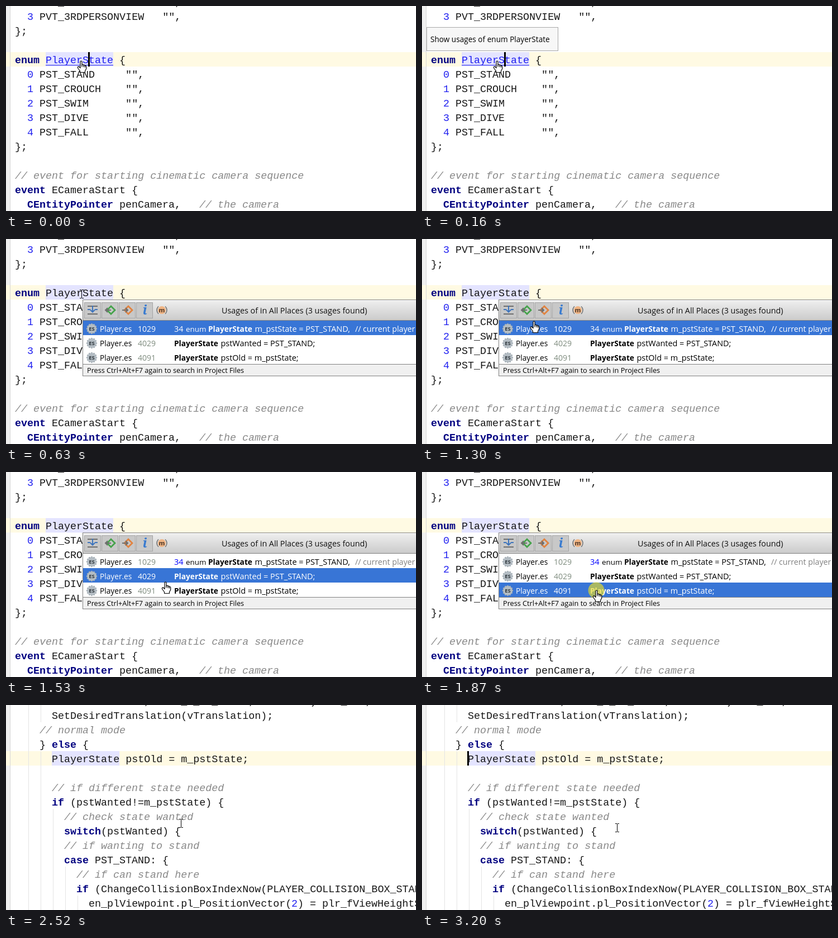
These frames come from a looping animation (734 by 369 pixels, 3280 ms). An HTML page with a canvas:

```html
<!DOCTYPE html>
<html lang="en">
<head>
<meta charset="utf-8">
<title>Show usages popup</title>
<style>
html, body { margin: 0; width: 100%; height: 100%; overflow: hidden; background: #fff; }
canvas { display: block; width: 734px; height: 369px; }
</style>
</head>
<body>
<canvas id="stage" width="734" height="369"></canvas>
<script>
const W = 734, H = 369, LOOP = 3280;
const LEFT = 16, CELL = 11, ROW = 26, TOP = 5, LIST = 147;
const ctx = document.getElementById('stage').getContext('2d');
const MONO = '18.35px "Liberation Mono", "Courier New", monospace';
const UI = '"Open Sans", "Noto Sans", sans-serif';
const INK = '#161616', NUMBER = '#2020f0';
const TOKENS = /\/\/.*|\b(?:enum|event|CEntityPointer|else|if|switch|case)\b|\b\d\b/g;

const enumCode = [
  '    PVT_                  ,',
  '  3 PVT_3RDPERSONVIEW   "",',
  '};',
  '',
  'enum PlayerState {',
  '  0 PST_STAND     "",',
  '  1 PST_CROUCH    "",',
  '  2 PST_SWIM      "",',
  '  3 PST_DIVE      "",',
  '  4 PST_FALL      "",',
  '};',
  '',
  '// event for starting cinematic camera sequence',
  'event ECameraStart {',
  '  CEntityPointer penCamera,   // the camera'
];
const stateCode = [
  ' '.repeat(21) + ',     _ _  _     ,         )    _   ,',
  '      SetDesiredTranslation(vTranslation);',
  '    // normal mode',
  '    } else {',
  '      PlayerState pstOld = m_pstState;',
  '',
  '      // if different state needed',
  '      if (pstWanted!=m_pstState) {',
  '        // check state wanted',
  '        switch(pstWanted) {',
  '        // if wanting to stand',
  '        case PST_STAND: {',
  '          // if can stand here',
  '          if (ChangeCollisionBoxIndexNow(PLAYER_COLLISION_BOX_STAND)) {',
  '            en_plViewpoint.pl_PositionVector(2) = plr_fViewHeightStand;'
];

function rect(x, y, w, h, color) {
  ctx.fillStyle = color;
  ctx.fillRect(x, y, w, h);
}

function text(s, x, y, font, color) {
  ctx.font = font;
  ctx.fillStyle = color;
  ctx.fillText(s, x, y);
}

function ui(s, x, y, size, color, weight = '') {
  text(s, x, y, `${weight} ${size}px ${UI}`, color);
}

function stroke(points, color, width = 2) {
  ctx.beginPath();
  points.forEach(([x, y]) => ctx.lineTo(x, y));
  ctx.strokeStyle = color;
  ctx.lineWidth = width;
  ctx.stroke();
}

function disc(x, y, r, color) {
  ctx.beginPath();
  ctx.arc(x, y, r, 0, Math.PI * 2);
  ctx.fillStyle = color;
  ctx.fill();
}

const colX = col => LEFT + col * CELL;

function codeLine(line, y) {
  let at = 0;
  const put = (s, style, color) => {
    text(s, colX(at), y, style + ' ' + MONO, color);
    at += s.length;
  };
  for (const m of line.matchAll(TOKENS)) {
    put(line.slice(at, m.index), '', INK);
    if (m[0].startsWith('//')) put(m[0], 'italic', '#888');
    else if (/\d/.test(m[0])) put(m[0], '', NUMBER);
    else put(m[0], 'bold', '#000080');
  }
  put(line.slice(at), '', INK);
}

function editor(lines, nameCol, guides) {
  rect(0, 0, W, H, '#fff');
  rect(0, 0, 7, H, '#f0f0f0');
  rect(0, 83, W, ROW, '#fffae3');
  rect(7, 0, 1, H, '#d6d6d6');
  guides.forEach(([x, y, h]) => rect(x, y, 1, h, '#e4e4e4'));
  rect(colX(nameCol), 83, 121, ROW, '#e4e4ff');
  lines.forEach((line, i) => codeLine(line, TOP + (i - 1) * ROW + 20));
}

function caret(col) {
  rect(colX(col) - 1, 83, 3, ROW, '#000');
}

function link() {
  rect(71, 83, 121, ROW, '#e4e4ff');
  text('PlayerState', 71, 103, MONO, NUMBER);
  rect(71, 106, 121, 1, NUMBER);
}

function tooltip() {
  rect(8, 38, 236, 43, '#a8a8a8');
  rect(9, 39, 234, 41, '#f7f7f7');
  ui('Show usages of enum PlayerState', 15, 65, 13.6, '#000');
}

function fileIcon(x, y) {
  for (let i = 0; i < 12; i++) {
    const a = i * Math.PI / 6;
    disc(x + 8 * Math.cos(a), y + 8 * Math.sin(a), 1.7, '#a3adb5');
  }
  disc(x, y, 8.3, '#b3bcc3');
  ctx.textAlign = 'center';
  ui('ES', x, y + 3.6, 9.5, '#30383e', 'bold');
  ctx.textAlign = 'left';
}

function diamond(x, y, color) {
  stroke([[x, y - 7], [x + 7, y], [x, y + 7], [x - 7, y], [x, y - 7], [x + 7, y]], color, 2.8);
}

// Small arrow with its head at (x, y), pointing right (1) or left (-1).
function arrow(x, y, dir, tail) {
  stroke([[x - dir * tail, y], [x, y]], '#6e6e6e');
  stroke([[x - 4 * dir, y - 4], [x, y], [x - 4 * dir, y + 4]], '#6e6e6e');
}

function toolbar() {
  const shade = ctx.createLinearGradient(0, 110, 0, LIST);
  shade.addColorStop(0, '#efefef');
  shade.addColorStop(1, '#cacaca');
  rect(138, 110, W - 138, LIST - 110, shade);
  rect(138, 110, W - 138, 1, '#fff');
  rect(138, LIST - 1, W - 138, 1, '#808080');
  for (let i = 0; i < 4; i++) {
    const x = 140 + i * 31;
    rect(x, 114, 30, 29, '#a4a4a4');
    rect(x + 1, 115, 28, 27, '#c8c8c8');
  }
  const blue = '#3d74bd';
  rect(146, 120, 18, 2, '#6e6e6e');
  rect(146, 126, 5, 2, blue);
  rect(159, 126, 5, 2, blue);
  rect(146, 134, 18, 2, '#6e6e6e');
  stroke([[155, 120], [155, 131]], blue);
  stroke([[151, 127.5], [155, 131.5], [159, 127.5]], blue);
  diamond(188, 128, '#45a34b');
  arrow(178, 128, -1, 10);
  diamond(219, 128, '#e2833f');
  arrow(218, 128, 1, 10);
  ctx.textAlign = 'center';
  text('i', 248.5, 136, 'italic bold 23px "Noto Serif", "Liberation Serif", serif', '#397bd0');
  disc(279, 128, 7, '#f0b483');
  ui('m', 279, 132, 11, '#4a3526', 'bold');
  ctx.textAlign = 'left';
  ctx.lineWidth = 1.6;
  ctx.strokeStyle = '#777';
  for (const a of [0, Math.PI]) {
    ctx.beginPath();
    ctx.arc(279, 128, 9, a - 0.85, a + 0.85);
    ctx.stroke();
  }
  ui('Usages of in All Places (3 usages found)', 386, 134, 14.3, '#111');
}

function usage(i, picked) {
  const top = LIST + i * ROW, y = top + 20;
  const tone = color => picked ? '#fff' : color;
  rect(138, top, W - 138, ROW, picked ? '#3875d6' : '#fff');
  fileIcon(153.5, top + 14.5);
  ui('Player.es', 168, y, 13.7, tone('#000'));
  ui(['1029', '4029', '4091'][i], 236, y, 14, tone('#7f8c7f'));
  const nameX = i ? 301 : 362;
  ui('PlayerState', nameX, y, 13.7, tone('#000'), 'bold');
  const rest = ['m_pstState = PST_STAND,', 'pstWanted = PST_STAND;', 'pstOld = m_pstState;'][i];
  ui(rest, nameX + 83.5, y, 14.45, tone('#000'));
  if (i) return;
  ui('34', 301, y, 14.4, tone('#0000ff'));
  ui('enum', 322, y, 13.4, tone('#000'));
  ui('// current player', 625, y, 14.2, tone('#808080'));
}

function popup(picked) {
  rect(137, 109, W - 137, 138, '#808080');
  toolbar();
  for (let i = 0; i < 3; i++) usage(i, i === picked);
  rect(138, 226, W - 138, 20, '#f0f0f0');
  ui('Press Ctrl+Alt+F7 again to search in Project Files', 145, 241, 12.7, '#000');
}

const HAND = new Path2D('M-2 1Q-.5-1 1 1V7Q3 5.5 4 7.5Q6 6.5 6.5 8.5Q8.5 8 8.7 10V14L6.5 18V20.5H-2.5V18L-6.5 12.5Q-7 9.5-4.5 10L-2 12.5Z');
const KNUCKLES = new Path2D('M1 7V10.5M4 7.5V11M6.5 8.5V11.5');

function hand(x, y) {
  ctx.save();
  ctx.translate(x, y);
  ctx.fillStyle = '#fff';
  ctx.fill(HAND);
  ctx.lineWidth = 1.2;
  ctx.lineJoin = 'round';
  ctx.strokeStyle = '#000';
  ctx.stroke(HAND);
  ctx.stroke(KNUCKLES);
  ctx.restore();
}

function beam(x, y) {
  rect(x, y - 7, 1, 14, '#000');
  for (const edge of [y - 8, y + 7]) {
    rect(x - 3, edge, 3, 1, '#000');
    rect(x + 1, edge, 3, 1, '#000');
  }
}

function clickMark(x, y) {
  disc(x, y, 14.5, 'rgba(232,220,36,.65)');
}

// The pointer advances in discrete, held steps along an eased path.
const STEPS = [1010, 1080, 1150, 1230, 1300, 1390, 1460, 1530, 1620, 1700];
const ease = u => u * u * (3 - 2 * u);

function pointer(t) {
  const u = STEPS.filter(s => t >= s).length / STEPS.length;
  return [
    Math.round(135 + 178 * ease(u ** 1.27)),
    Math.round(99 + 114 * ease(u ** 1.15))
  ];
}

const GUIDES = [[40, 0, H], [62, 0, 31], [62, 83, H], [84, 187, H], [106, 291, H], [128, 343, H]];

function draw(t) {
  if (t >= 1960) {
    editor(stateCode, 6, GUIDES);
    if (t < 2520 || t >= 2970) caret(6);
    if (t < 3200) beam(313, 213);
    else beam(349, 221);
    return;
  }
  editor(enumCode, 5, []);
  const [x, y] = pointer(t);
  if (t < 630) {
    link();
    const clicked = t >= 540;
    caret(clicked ? 11 : 12);
    if (t >= 160 && !clicked) tooltip();
    if (clicked) clickMark(x - 1, y);
    hand(x, y);
    return;
  }
  popup(Math.max(0, Math.floor((y - LIST) / ROW)));
  if (t >= 1870) clickMark(x - 1, y);
  if (y < 110) beam(x, y);
  else hand(x, y);
}

const start = performance.now();
function tick() {
  draw((performance.now() - start) % LOOP);
  requestAnimationFrame(tick);
}
tick();
</script>
</body>
</html>
```
